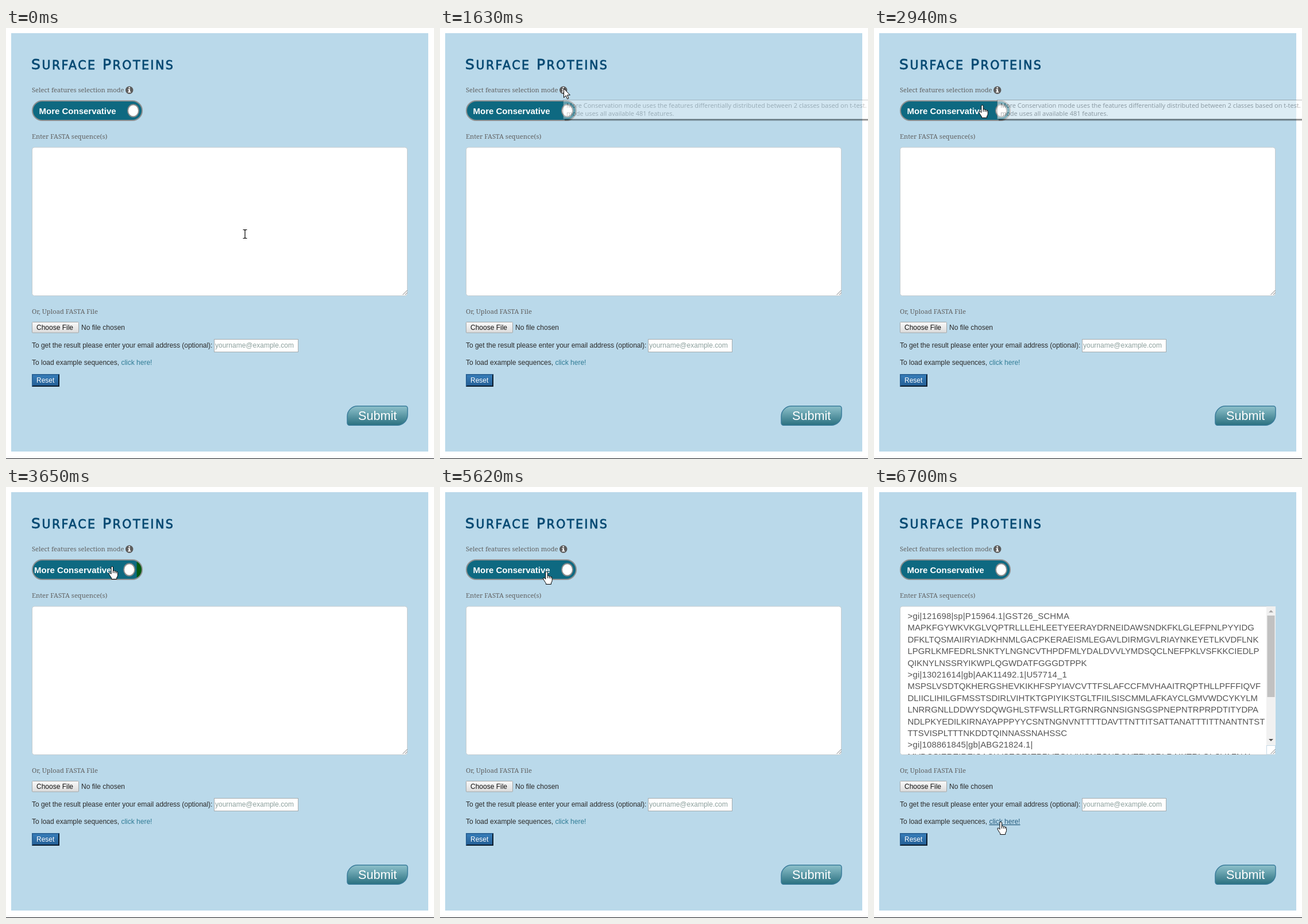
Recreate the animation shown at these times as an HTML page. Size 745x751 px, loop 8000 ms.

```html
<!DOCTYPE html>
<html lang="en">
<head>
<meta charset="utf-8">
<title>Sequence form</title>
<style>
  html, body { margin: 0; width: 100%; height: 100%; overflow: hidden; background: #fff; }
  svg { display: block; }
  text { font: 12px "Liberation Sans", Arial, sans-serif; fill: #2b2b2b; white-space: pre; }
  text.title { font: 25px "DejaVu Sans", sans-serif; letter-spacing: 2.5px; fill: #074a73; stroke: #074a73; stroke-width: .8; }
  .title .small { font-size: 20.5px; }
  text.label { font: 11.2px "Noto Serif", serif; fill: #626262; }
  text.mode { font-size: 15px; font-weight: bold; fill: #fff; }
  text.tip { font: 11px "Open Sans", "Noto Sans", sans-serif; letter-spacing: -.03px; fill: #575757; }
  text.seq { font-size: 14.93px; fill: #555; }
  text.head { letter-spacing: .2px; }
  .link { fill: #2f7b95; }
  .link.over { fill: #235a7c; text-decoration: underline; }
  .cursor { stroke: #000; stroke-linejoin: round; fill: #fff; }
</style>
</head>
<body>
<svg width="745" height="751" viewBox="0 0 745 751">
  <defs>
    <linearGradient id="grey" x2="0" y2="1"><stop stop-color="#f9f9f9"/><stop offset="1" stop-color="#dcdcdc"/></linearGradient>
    <linearGradient id="blue" x2="0" y2="1"><stop stop-color="#377db9"/><stop offset="1" stop-color="#245f96"/></linearGradient>
    <linearGradient id="teal" x2="0" y2="1"><stop stop-color="#8fc2cc"/><stop offset="1" stop-color="#2a7080"/></linearGradient>
    <linearGradient id="shade" x2="0" y2="1"><stop stop-opacity=".6"/><stop offset="1" stop-opacity="0"/></linearGradient>
    <clipPath id="pill"><rect x="46" y="127" width="191" height="34" rx="17"/></clipPath>
    <clipPath id="area"><rect x="46" y="209" width="637" height="257"/></clipPath>
  </defs>

  <rect x="9" y="9" width="726" height="729" fill="#bad9ea"/>
  <rect y="750" width="745" height="1" fill="#15171c"/>

  <text class="title" x="44" y="72">S<tspan class="small">URFACE</tspan> P<tspan class="small">ROTEINS</tspan></text>
  <text class="label" x="45" y="112">Select features selection mode</text>
  <circle cx="214.7" cy="108.3" r="6.7" fill="#5c5c5c"/>
  <path d="M213.4 103.3h2.6v2h-2.6zM212.4 106.4h3.6v4.4h1.2v1.6h-4.9v-1.6h1.2v-2.8h-1.1z" fill="#fff"/>

  <g clip-path="url(#pill)">
    <rect x="46" y="127" width="191" height="34" fill="#055a13"/>
    <g id="slider">
      <rect x="-160" y="127" width="396" height="34" fill="#0e6981"/>
      <text class="mode" x="57.5" y="149.5">More Conservative</text>
      <text class="mode" x="280.5" y="149.5">Less Conservative</text>
    </g>
    <ellipse id="knob" cy="144" rx="9.5" ry="10.6" fill="#fff" stroke="#8d8d8d" stroke-width="2"/>
  </g>
  <rect x="46" y="127" width="191" height="34" rx="17" fill="none" stroke="#8d8f90" stroke-width="2"/>

  <text class="label" x="45" y="193">Enter FASTA sequence(s)</text>
  <rect x="45.5" y="208" width="653" height="258.5" rx="4" fill="#fff" stroke="#c4ccd0"/>
  <path id="grip" d="M690.5 465l8-8M694.5 465l4-4" stroke="#777" fill="none"/>

  <g id="filled">
    <g id="lines" clip-path="url(#area)"></g>
    <rect x="683" y="208" width="16" height="242" fill="#f1f1f1"/>
    <rect x="684.5" y="224" width="13" height="142" fill="#c1c1c1"/>
    <path d="M687 218.5l4-4 4 4z" fill="#a3a3a3"/>
    <path d="M687 439l4 4 4-4z" fill="#505050"/>
    <rect x="683.5" y="450.5" width="15" height="15.5" fill="#fff" stroke="#c5d9e6"/>
    <path d="M690.5 465l8-8M694.5 465l4-4" stroke="#777"/>
  </g>

  <text class="label" x="45" y="498">Or, Upload FASTA File</text>
  <rect x="45.5" y="512.5" width="81" height="18.5" rx="1" fill="url(#grey)" stroke="#a4a7a8"/>
  <text x="53" y="526" style="fill:#111">Choose File</text>
  <text x="131" y="526">No file chosen</text>

  <text x="45" y="557" letter-spacing="-.03">To get the result please enter your email address (optional):</text>
  <rect x="362.5" y="542.5" width="146" height="22" fill="#fff" stroke="#a5acaf"/>
  <text x="364" y="557" style="fill:#8ca09d">yourname@example.com</text>

  <text x="45" y="587">To load example sequences, <tspan class="link" id="link">click here!</tspan></text>

  <rect x="45" y="603" width="48" height="22" fill="#0b1c2c"/>
  <path d="M45 625V603H93L91 605H47V623z" fill="#2a6397"/>
  <rect x="47" y="605" width="44" height="18" fill="url(#blue)"/>
  <text x="53" y="617.5" style="fill:#fff">Reset</text>

  <path d="M612 658.7H695a4 4 0 0 1 4 4V674.3a18 18 0 0 1-18 18H598a4 4 0 0 1-4-4V676.7a18 18 0 0 1 18-18z" fill="url(#teal)" stroke="#3a7c9b" stroke-width="1.5"/>
  <text x="613" y="683" style="font-size:21.6px;fill:#fff">Submit</text>

  <rect id="shadow" x="217" y="159" width="600" height="3.5" fill="url(#shade)"/>
  <g id="tip">
    <rect x="214.5" y="125.5" width="600" height="33" fill="#fff" stroke="#767676"/>
    <text class="tip" x="220" y="138.5">More Conservation mode uses the features differentially distributed between 2 classes based on t-test.</text>
    <text class="tip" x="220" y="153">mode uses all available 481 features.</text>
  </g>

  <g id="pointer" class="cursor">
    <path id="beam" d="M-3.5-7.5H-1L0-6.5 1-7.5H3.5M0-6.5V6.5M-3.5 7.5H-1L0 6.5 1 7.5H3.5" fill="none" stroke-width="1.2"/>
    <path id="arrow" d="M.5.5V16.3L4.2 12.8 6.6 18.6 9 17.6 6.5 11.9H11.4z"/>
    <g id="hand">
      <path d="M-2 2Q-2 .5-.3.5T1.5 2V8Q3.5 6.8 4.6 8.8 6.4 7.8 7.3 9.7 9.5 9 9.5 11.5V15.5Q9.5 18 7.7 20V22.5H-1.3V20.5Q-3 18.5-4.6 15.6L-6 13Q-6.4 10.8-4.2 11.2L-2 13.5z"/>
      <path d="M1.5 8V12M4.6 8.8V12.2M7.3 9.7V12.5" fill="none"/>
    </g>
  </g>
</svg>
<script>
const LOOP = 8000, FILL_AT = 6700;
const $ = id => document.getElementById(id);

const clamp = v => Math.min(1, Math.max(0, v));
const linear = p => p;
const swing = p => .5 - .5 * Math.cos(Math.PI * clamp(p));
const easeOut = p => 1 - (1 - p) ** 3;

// How many of n evenly timed steps have been taken at time t.
const stepsDone = (t, from, to, n) =>
  t < from ? 0 : Math.min(n, 1 + Math.floor((t - from) * (n - 1) / (to - from)));

const home = { x: 416, y: 359 };
const moves = [
  { from: 70, to: 150, n: 2, x: 353.5, y: 276, ease: linear },
  { from: 300, to: 840, n: 8, x: 215, y: 98, ease: swing },
  { from: 990, to: 1070, n: 2, x: 215, y: 105, ease: linear },
  { from: 2710, to: 3110, n: 6, x: 185, y: 138, ease: easeOut },
  { from: 5620, to: 6400, n: 11, x: 221, y: 583, ease: swing }
];

function pointerAt(t) {
  return moves.reduce((p, m) => {
    const k = m.ease(stepsDone(t, m.from, m.to, m.n) / m.n);
    return { x: p.x + (m.x - p.x) * k, y: p.y + (m.y - p.y) * k };
  }, home);
}

// The switch begins to slide shortly before its first visible step.
function slide(t, from, to, n) {
  const lead = 50, done = stepsDone(t, from, to, n);
  const elapsed = (to - from) * (done - 1) / (n - 1);
  return done && swing((lead + elapsed) / (lead + to - from));
}

function tipOpacity(t) {
  const shown = (stepsDone(t, 1540, 1630, 2) + stepsDone(t, 1770, 1800, 2)) / 4;
  return shown ** 1.5 - stepsDone(t, 2870, 2950, 2) / 2;
}

const sequences = [
  ">gi|121698|sp|P15964.1|GST26_SCHMA",
  "MAPKFGYWKVKGLVQPTRLLLEHLEETYEERAYDRNEIDAWSNDKFKLGLEFPNLPYYIDG",
  "DFKLTQSMAIIRYIADKHNMLGACPKERAEISMLEGAVLDIRMGVLRIAYNKEYETLKVDFLNK",
  "LPGRLKMFEDRLSNKTYLNGNCVTHPDFMLYDALDVVLYMDSQCLNEFPKLVSFKKCIEDLP",
  "QIKNYLNSSRYIKWPLQGWDATFGGGDTPPK",
  ">gi|13021614|gb|AAK11492.1|U57714_1",
  "MSPSLVSDTQKHERGSHEVKIKHFSPYIAVCVTTFSLAFCCFMVHAAITRQPTHLLPFFFIQVF",
  "DLIICLIHILGFMSSTSDIRLVIHTKTGPIYIKSTGLTFIILSISCMMLAFKAYCLGMVWDCYKYLM",
  "LNRRGNLLDDWYSDQWGHLSTFWSLLRTGRNRGNNSIGNSGSPNEPNTRPRPDTITYDPA",
  "NDLPKYEDILKIRNAYAPPPYYCSNTNGNVNTTTTDAVTTNTTITSATTANATTTITTNANTNTST",
  "TTSVISPLTTTNKDDTQINNASSNAHSSC",
  ">gi|108861845|gb|ABG21824.1|",
  "MVDCSIEREIREICACLVSEGFATPRVEGLVKISNFGNRGNTFVCRLRAIKTRLGLCVAFNAL"
];
$("lines").innerHTML = sequences.map((s, i) =>
  `<text class="seq ${s[0] === ">" ? "head" : ""}" x="58.5" y="${230 + 20.4 * i}">${s.replace(">", "&gt;")}</text>`).join("");

const show = (id, on) => $(id).setAttribute("display", on ? "inline" : "none");
const inside = ({ x, y }, l, t, r, b) => x >= l && x <= r && y >= t && y <= b;

function draw(t) {
  const less = slide(t, 3650, 3970, 5) - slide(t, 4750, 4980, 4);
  $("slider").setAttribute("transform", `translate(${-189 * less} 0)`);
  $("knob").setAttribute("cx", 221.5 - 155.5 * less);

  const opacity = tipOpacity(t);
  $("tip").setAttribute("opacity", opacity);
  show("shadow", opacity > 0);
  show("filled", t >= FILL_AT);
  show("grip", t < FILL_AT);

  const p = pointerAt(t);
  const onLink = inside(p, 200, 575, 254, 591);
  const onText = inside(p, 45, 208, 699, 466);
  const hand = onLink || inside(p, 45, 126, 238, 162);
  $("pointer").setAttribute("transform", `translate(${p.x} ${p.y})`);
  show("beam", onText);
  show("hand", hand);
  show("arrow", !onText && !hand);
  $("link").classList.toggle("over", onLink);
}

const start = performance.now();
function tick() {
  draw((performance.now() - start) % LOOP);
  requestAnimationFrame(tick);
}
tick();
</script>
</body>
</html>
```
